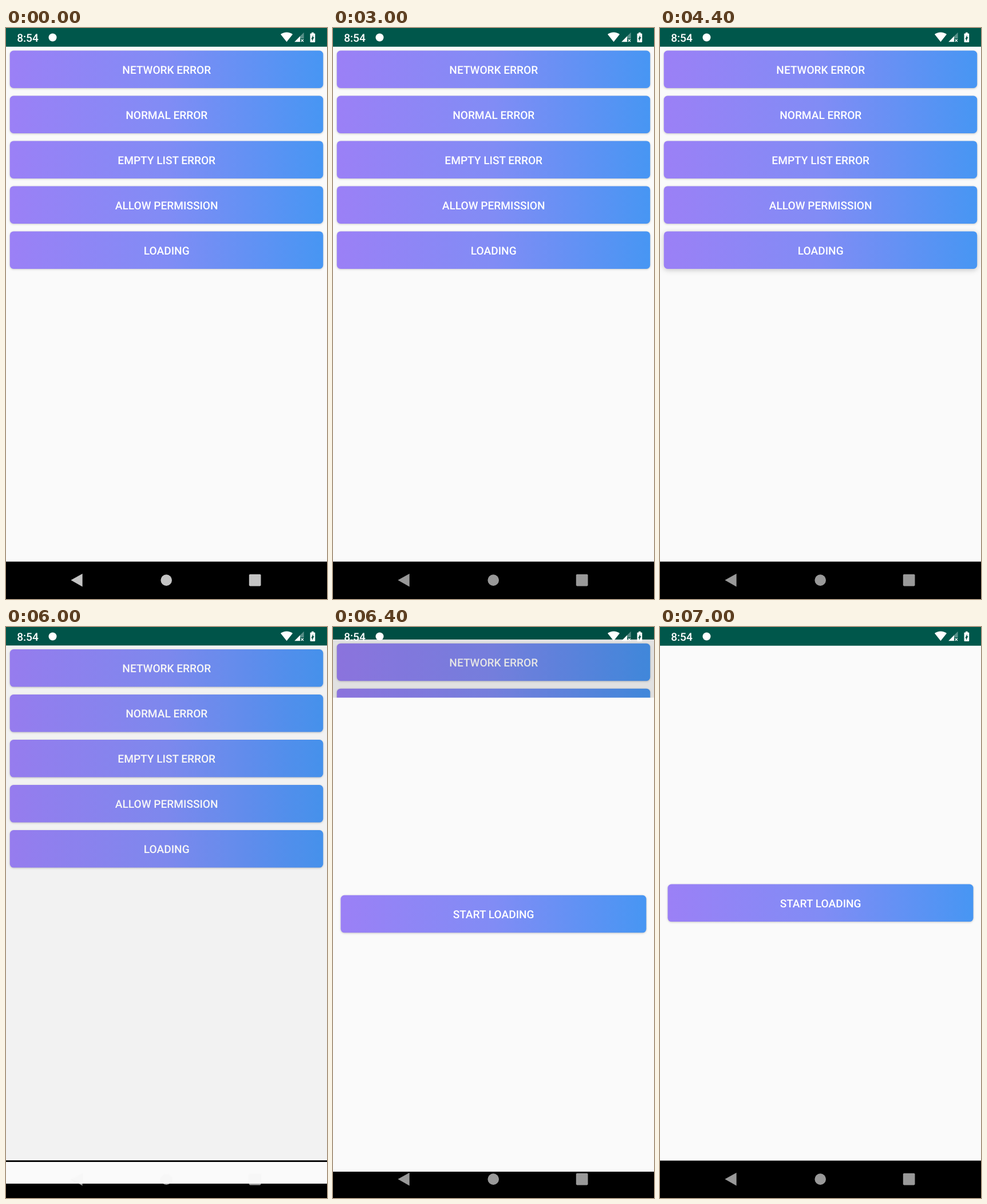
An HTML page with a canvas that plays this animation: 561 px wide and 998 px high, repeating every 8000 ms.

```html
<!DOCTYPE html>
<html lang="en">
<head>
<meta charset="utf-8">
<title>Error screens</title>
<style>
html, body { margin: 0; width: 100%; height: 100%; overflow: hidden; background: #000; }
canvas { display: block; }
</style>
</head>
<body>
<canvas id="stage" width="561" height="998"></canvas>
<script>
const W = 561, H = 998, LOOP = 8000;
const BAR = 32.7, NAV = 932.8, NAV_MID = 965.1, BTN_H = 65.5;
const MENU = ['NETWORK ERROR', 'NORMAL ERROR', 'EMPTY LIST ERROR', 'ALLOW PERMISSION', 'LOADING'];
const PRESS = 4200, RELEASE = 5500, SWITCH = 6000;
const ctx = document.getElementById('stage').getContext('2d');

const clamp = v => Math.max(0, Math.min(1, v));
const mix = (a, b, k) => a + (b - a) * k;
const smooth = k => k * k * (3 - 2 * k);

// Cubic easing with the given x and y control values, solved by bisection.
function ease(x, xs, ys) {
  const at = (s, [a, b, c, d]) => {
    const r = 1 - s;
    return r * r * r * a + 3 * r * r * s * b + 3 * r * s * s * c + s * s * s * d;
  };
  let lo = 0, hi = 1;
  for (let i = 0; i < 24; i++) {
    const m = (lo + hi) / 2;
    if (at(m, xs) < x) lo = m; else hi = m;
  }
  return at(lo, ys);
}
const slideEase = x => ease(x, [0, 0.4, 0.2, 1], [0, 0, 1, 1]);
const revealEase = x => x < 1 / 6
  ? ease(x, [0, 0.05, 2 / 15, 1 / 6], [0, 0, 0.06, 0.4])
  : ease(x, [1 / 6, 5 / 24, 0.25, 1], [0.4, 0.82, 1, 1]);

function poly(...points) {
  ctx.beginPath();
  points.forEach(([x, y]) => ctx.lineTo(x, y));
  ctx.fill();
}

function disc(x, y, r) {
  ctx.beginPath();
  ctx.arc(x, y, r, 0, 2 * Math.PI);
  ctx.fill();
}

function roundBox(x, y, w, h, r) {
  ctx.beginPath();
  ctx.roundRect(x, y, w, h, r);
  ctx.fill();
}

function text(str, x, y, align) {
  ctx.font = '500 19.1px Roboto, "Open Sans", sans-serif';
  ctx.textRendering = 'geometricPrecision';
  ctx.textAlign = align;
  ctx.fillStyle = '#fff';
  ctx.fillText(str, x, y);
}

function button(label, x, y, lift = 0) {
  const w = W - 2 * x;
  const fill = ctx.createLinearGradient(x, 0, x + w, 0);
  ['#9b80f6', '#818cf5', '#4796f3'].forEach((c, i) => fill.addColorStop(i / 2, c));
  ctx.save();
  ctx.shadowColor = 'rgba(0,0,0,.22)';
  ctx.shadowBlur = mix(3.5, 10, lift);
  ctx.shadowOffsetY = mix(0.9, 2, lift);
  ctx.fillStyle = fill;
  roundBox(x, y, w, BTN_H, 6.5);
  ctx.restore();
  text(label, W / 2 + 0.2, y + 40.2, 'center');
}

function page(content) {
  ctx.fillStyle = '#fafafa';
  ctx.fillRect(0, 0, W, NAV);
  ctx.fillStyle = '#00574b';
  ctx.fillRect(0, 0, W, BAR);
  ctx.fillStyle = '#000';
  ctx.fillRect(0, NAV, W, H - NAV);
  content();
}

const menuPage = lift => page(() => MENU.forEach((label, i) =>
  button(label, 6.75, 39.5 + i * 78.98, label === 'LOADING' ? lift : 0)));
const loadPage = () => page(() => button('START LOADING', 13.5, 449.6));

function wifi(x, y, r) {
  const up = -Math.PI / 2, half = 0.677;
  ctx.beginPath();
  ctx.moveTo(x, y);
  ctx.arc(x, y, r, up - half, up + half);
  ctx.fill();
}

// Signal wedge: left part solid, the rest faint, with a small cross.
function signal(x, y, size) {
  const cut = size * 0.6, arm = 2.2, cx = x + size - 2.8, cy = y - 2.4;
  ctx.fillStyle = 'rgba(255,255,255,.35)';
  poly([x + cut, y], [x + cut, y - cut], [x + size, y - size], [x + size, y - 6], [x + cut, y - 6]);
  ctx.fillStyle = '#fff';
  poly([x, y], [x + cut, y - cut], [x + cut, y]);
  ctx.strokeStyle = '#fff';
  ctx.lineWidth = 1.3;
  ctx.beginPath();
  for (const s of [-1, 1]) {
    ctx.moveTo(cx - arm, cy - s * arm);
    ctx.lineTo(cx + arm, cy + s * arm);
  }
  ctx.stroke();
}

// Battery on a 10 by 20 grid; the bolt is one half turned twice.
function battery(x, y, unit) {
  ctx.save();
  ctx.translate(x, y);
  ctx.scale(unit, unit);
  ctx.fillRect(-2, -10, 4, 3);
  roundBox(-5, -8, 10, 18, 1.3);
  ctx.fillStyle = '#00574b';
  const bolt = s => [[-s, s * 8], [-s, s * 2.5], [-3 * s, s * 2.5]];
  ctx.translate(0, 1.5);
  ctx.scale(1, 0.8);
  poly(...bolt(1), ...bolt(-1));
  ctx.restore();
}

function statusIcons() {
  text('8:54', 19.2, 24, 'left');
  disc(81.5, 16.5, 7);
  wifi(490.5, 24.2, 16.8);
  signal(504.2, 24.2, 16.4);
  battery(535.9, 16.4, 0.87);
}

function navIcons(alpha) {
  ctx.save();
  ctx.shadowColor = 'rgba(0,0,0,.1)';
  ctx.shadowBlur = 1.5;
  ctx.shadowOffsetY = 0.5;
  ctx.fillStyle = `rgba(255,255,255,${alpha})`;
  poly([113.4, NAV_MID], [133.6, NAV_MID - 11.3], [133.6, NAV_MID + 11.3]);
  disc(280.2, NAV_MID, 9.8);
  roundBox(424.8, NAV_MID - 10.3, 20.7, 20.6, 1.8);
  ctx.restore();
}

// x is the progress of the change from the menu to the loading screen.
function transition(x) {
  const p = slideEase(x);
  ctx.save();
  ctx.translate(0, -0.0205 * H * p);
  menuPage(0);
  ctx.fillStyle = `rgba(0,0,0,${0.1 * clamp(x / 0.275)})`;
  ctx.fillRect(0, 0, W, H);
  ctx.restore();

  ctx.save();
  ctx.translate(0, 0.041 * H * (1 - p));
  ctx.beginPath();
  ctx.rect(0, 0.96 * H * (1 - revealEase(x)), W, H);
  ctx.clip();
  loadPage();
  ctx.restore();
}

function draw(now) {
  const t = Math.floor(now / 100) * 100;
  ctx.fillStyle = '#000';
  ctx.fillRect(0, 0, W, H);
  if (t < SWITCH) {
    menuPage(t < RELEASE ? clamp((t - PRESS) / 200) : 0);
  } else {
    const k = clamp((t - SWITCH) / 1000);
    transition(mix(0.086, 1, smooth(k ** 1.1)));
  }
  statusIcons();
  navIcons(mix(0.77, 0.6, clamp((t - 200) / 900)));
}

function tick(now) {
  draw(now % LOOP);
  requestAnimationFrame(tick);
}
draw(0);
requestAnimationFrame(tick);
</script>
</body>
</html>
```
